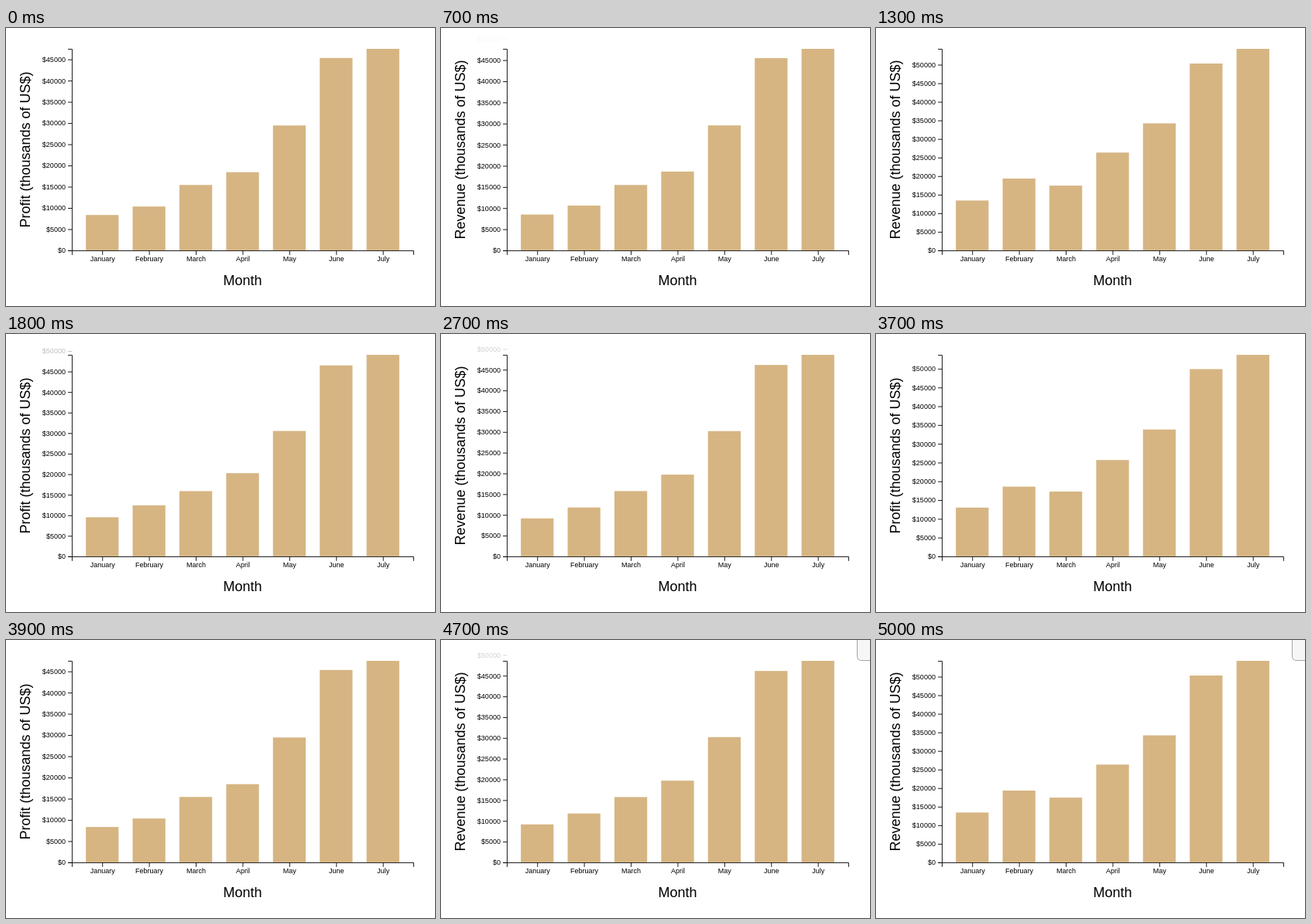
Write an HTML page that moves like this. It is 554 px wide and 360 px high and loops after 5.7 s.

```html
<!DOCTYPE html>
<html lang="en">
<head>
<meta charset="utf-8">
<title>Monthly results</title>
<style>
  html, body { margin: 0; width: 100%; height: 100%; overflow: hidden; background: #fff; }
  svg { display: block; }
  text { font: 10px "Liberation Sans", Arial, sans-serif; text-anchor: middle; }
  .title { font-size: 20px; }
  .ticks text { text-anchor: end; }
  path { fill: none; stroke: #000; }
  .bars { fill: #d6b583; }
</style>
</head>
<body>
<svg width="554" height="360" viewBox="0 0 554 360">
  <g id="chart" transform="translate(85 27) scale(.9)">
    <text class="title" x="245" y="340">Month</text>
    <text class="title" id="label" x="-145" y="-60" transform="rotate(-90)"></text>
    <path d="M.5 296.5v-6h490v6M-5.5 .5h6v290h-6"/>
  </g>
  <rect id="panel" x="537.5" y="-10" width="40" height="36.5" rx="5" fill="#f6f6f6" stroke="#a3a3a3"/>
</svg>
<script>
const LOOP = 5700, FRAME = 100, FADE = 250;
const WIDTH = 490, HEIGHT = 290;
const STARTS = [650, 1650, 2611, 3634, 4611];   // each start swaps the shown series
const months = ['January', 'February', 'March', 'April', 'May', 'June', 'July'];
const profit = [8342, 10342, 15423, 18432, 29434, 45343, 47492];
const revenue = [13432, 19342, 17443, 26342, 34213, 50321, 54273];

const chart = document.getElementById('chart');
const label = document.getElementById('label');
const panel = document.getElementById('panel');

function add(parent, tag, attrs = {}, text = '') {
  const el = document.createElementNS('http://www.w3.org/2000/svg', tag);
  set(el, attrs);
  el.textContent = text;
  return parent.appendChild(el);
}

function set(el, attrs) {
  for (const key in attrs) el.setAttribute(key, attrs[key]);
}

const step = WIDTH / (months.length + .3), band = step * .7;
const barGroup = add(chart, 'g', { class: 'bars' });
const bars = months.map((month, i) => {
  const x = step * (i + .3), mid = x + band / 2;
  add(chart, 'path', { d: `M${mid + .5} 290.5v6` });
  add(chart, 'text', { x: mid + .5, y: 306.1 }, month);
  return add(barGroup, 'rect', { x, width: band });
});

const tickGroup = add(chart, 'g', { class: 'ticks' });
const ticks = Array.from({ length: 11 }, (_, i) => {
  const g = add(tickGroup, 'g');
  add(g, 'path', { d: 'M-5.5 .5h6' });
  add(g, 'text', { x: -9, y: 3.7 }, '$' + i * 5000);
  return g;
});

const ease = t => t < .5 ? 4 * t ** 3 : 1 - 4 * (1 - t) ** 3;

// Height in pixels, blended between the two scales (mix 0 = profit, 1 = revenue)
const blend = (p, r, mix) => HEIGHT * (p / profit[6] * (1 - mix) + r / revenue[6] * mix);

function draw(now) {
  const t = Math.floor(now % LOOP / FRAME) * FRAME;
  const swaps = STARTS.filter(s => s <= t).length;
  const toRevenue = swaps % 2 === 1;
  const done = swaps ? ease(Math.min(1, (t - STARTS[swaps - 1]) / FADE)) : 1;
  const mix = toRevenue ? done : 1 - done;

  label.textContent = `${toRevenue ? 'Revenue' : 'Profit'} (thousands of US$)`;
  bars.forEach((bar, i) => {
    const height = blend(profit[i], revenue[i], mix);
    set(bar, { y: HEIGHT - height, height });
  });
  ticks.forEach((tick, i) => {
    const y = HEIGHT - blend(i * 5000, i * 5000, mix);
    set(tick, { transform: `translate(0 ${y})` });
  });
  set(ticks[10], { opacity: mix });   // the top tick exists only on the revenue scale
  set(panel, { opacity: t < 4400 ? 0 : t < 4500 ? .6 : 1 });
  requestAnimationFrame(tick);
}

let origin;
function tick(now) {
  origin ??= now;
  draw(now - origin);
}
requestAnimationFrame(tick);
</script>
</body>
</html>
```
